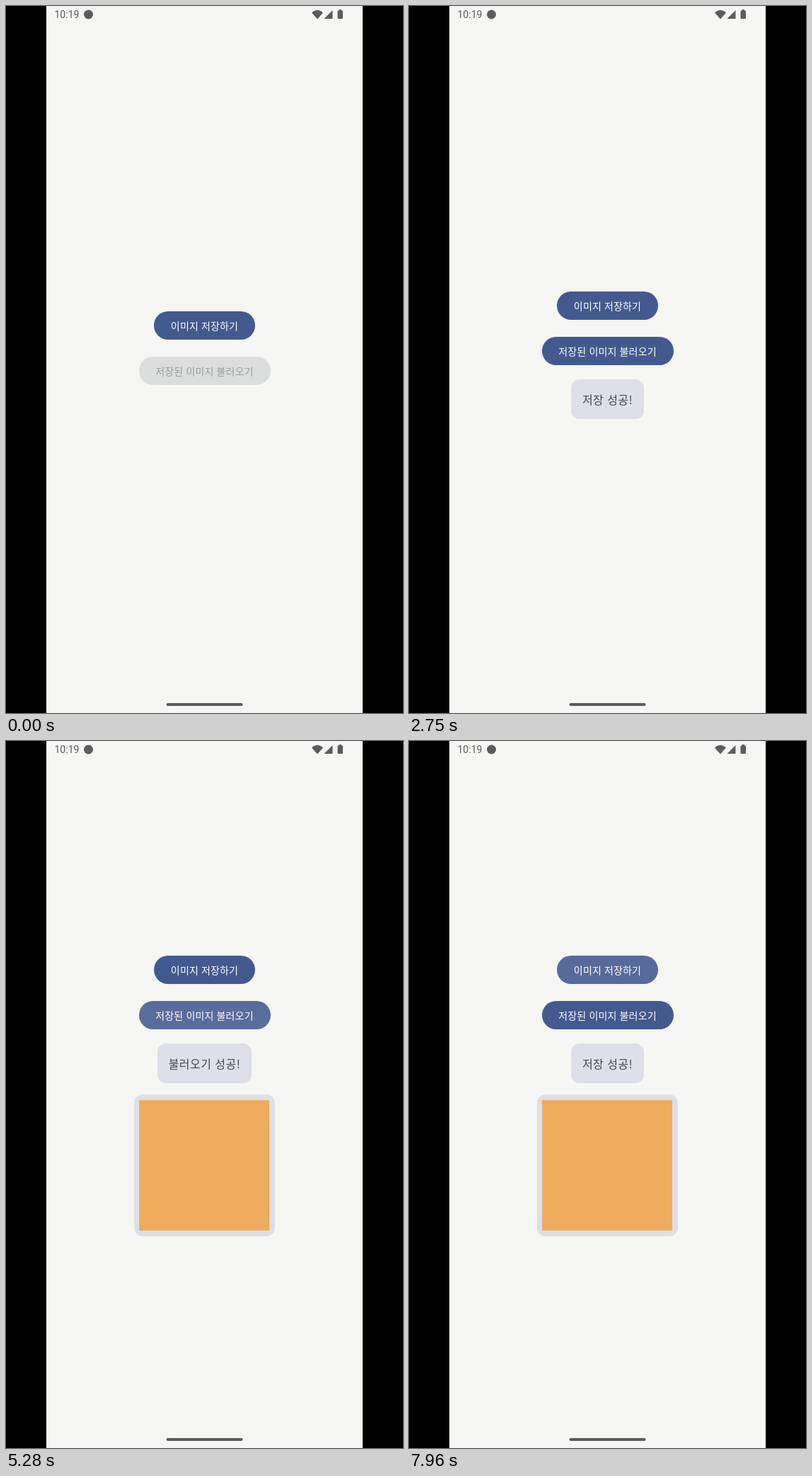
Animation of 561 by 998 pixels, one loop 8 s. Source, as an HTML page:

```html
<!DOCTYPE html>
<html lang="ko">
<head>
<meta charset="utf-8">
<style>
html, body { margin: 0; width: 100%; height: 100%; overflow: hidden; background: #000; }
div, svg { position: absolute; }
#screen { left: 57px; top: 0; width: 447px; height: 998px; background: #f6f6f4; }
#time { left: 11.5px; top: 2px; font: 14px/21px Roboto, sans-serif; color: #5c5c5c; }
#icons { left: 0; top: 0; fill: #5c5c5c; }
#column { left: 0; width: 447px; }
.btn, .card { text-align: center; white-space: nowrap; font-family: "Noto Sans CJK KR", "Noto Sans CJK", "Noto Sans", sans-serif; }
.btn { height: 39.7px; border-radius: 20px; font-size: 14px; line-height: 41px; letter-spacing: .15px; color: #fff; }
#save { left: 152px; top: 0; width: 143px; }
#load { left: 130.5px; top: 64px; width: 186px; }
.card { background: #dedfe8; border-radius: 12px; }
#note { top: 124px; height: 56px; font-size: 16px; line-height: 56px; letter-spacing: .45px; color: #44464f; }
#image { left: 123.7px; top: 196px; width: 199.3px; height: 200px; }
#image div { left: 7.8px; top: 8px; width: 184px; height: 184px; background: #f0ac5e; }
</style>
</head>
<body>
<div id="screen">
  <div id="time">10:19</div>
  <svg id="icons" width="447" height="998">
    <circle cx="59.5" cy="12" r="6.5"/>
    <path d="M375 9.5Q383 2 391 9.5L383 18.5ZM392.5 18L404.5 6V18Z"/>
    <path d="M413.5 6.5V5H417V6.5H418Q419 6.5 419 7.5V17Q419 18 418 18H412.5Q411.5 18 411.5 17V7.5Q411.5 6.5 412.5 6.5Z"/>
    <rect x="169.5" y="984" width="108" height="4" rx="2"/>
  </svg>
  <div id="column">
    <div id="save" class="btn">이미지 저장하기</div>
    <div id="load" class="btn">저장된 이미지 불러오기</div>
    <div id="note" class="card"></div>
    <div id="image" class="card"><div></div></div>
  </div>
</div>
<script>
const LOOP = 8000, BLUE = '#445a8f';
const FIRST_SAVE = 800, LOADED = 3910, SECOND_SAVE = 6700;
const [column, save, load, note, image] =
  ['column', 'save', 'load', 'note', 'image'].map(id => document.getElementById(id));
const clamp = v => Math.max(0, Math.min(1, v));

// Soft white circle that grows from the touch point towards the button's centre, then fades.
function ripple(age, x, y, width) {
  if (age < 0 || age > 2200) return BLUE;
  const grow = Math.max(.05, Math.min(2, (age - 60) / 400));
  const move = clamp(grow);
  const cx = x + (width / 2 - x) * move, cy = y + (20 - y) * move;
  const radius = 1.25 * grow * Math.hypot(width / 2, 20);
  const alpha = .26 * Math.min(clamp((age - 100) / 100), clamp((2200 - age) / 1600));
  const white = a => `rgba(255,255,255,${a})`;
  return `radial-gradient(circle at ${cx}px ${cy}px, ${white(alpha)} ${radius * .6}px, ${white(0)} ${radius}px), ${BLUE}`;
}

function setNote(text, width) {
  note.textContent = text;
  note.style.width = width + 'px';
  note.style.left = 223.5 - width / 2 + 'px';
}

function draw(t) {
  const saved = t >= FIRST_SAVE, loaded = t >= LOADED;
  column.style.top = (loaded ? 303 : saved ? 403 : 431) + 'px';
  save.style.background = ripple(t - (t < 6400 ? 500 : 6400), 98, 29, 143);
  load.style.background = saved ? ripple(t - 3790, 129, 20, 186) : '#dcdedd';
  load.style.color = saved ? '#fff' : '#999ba0';
  note.style.display = saved ? '' : 'none';
  image.style.display = loaded ? '' : 'none';
  if (loaded && t < SECOND_SAVE) setNote('불러오기 성공!', 133);
  else setNote('저장 성공!', 103);
}

function tick() {
  draw(performance.now() % LOOP);
  requestAnimationFrame(tick);
}
tick();
</script>
</body>
</html>
```
